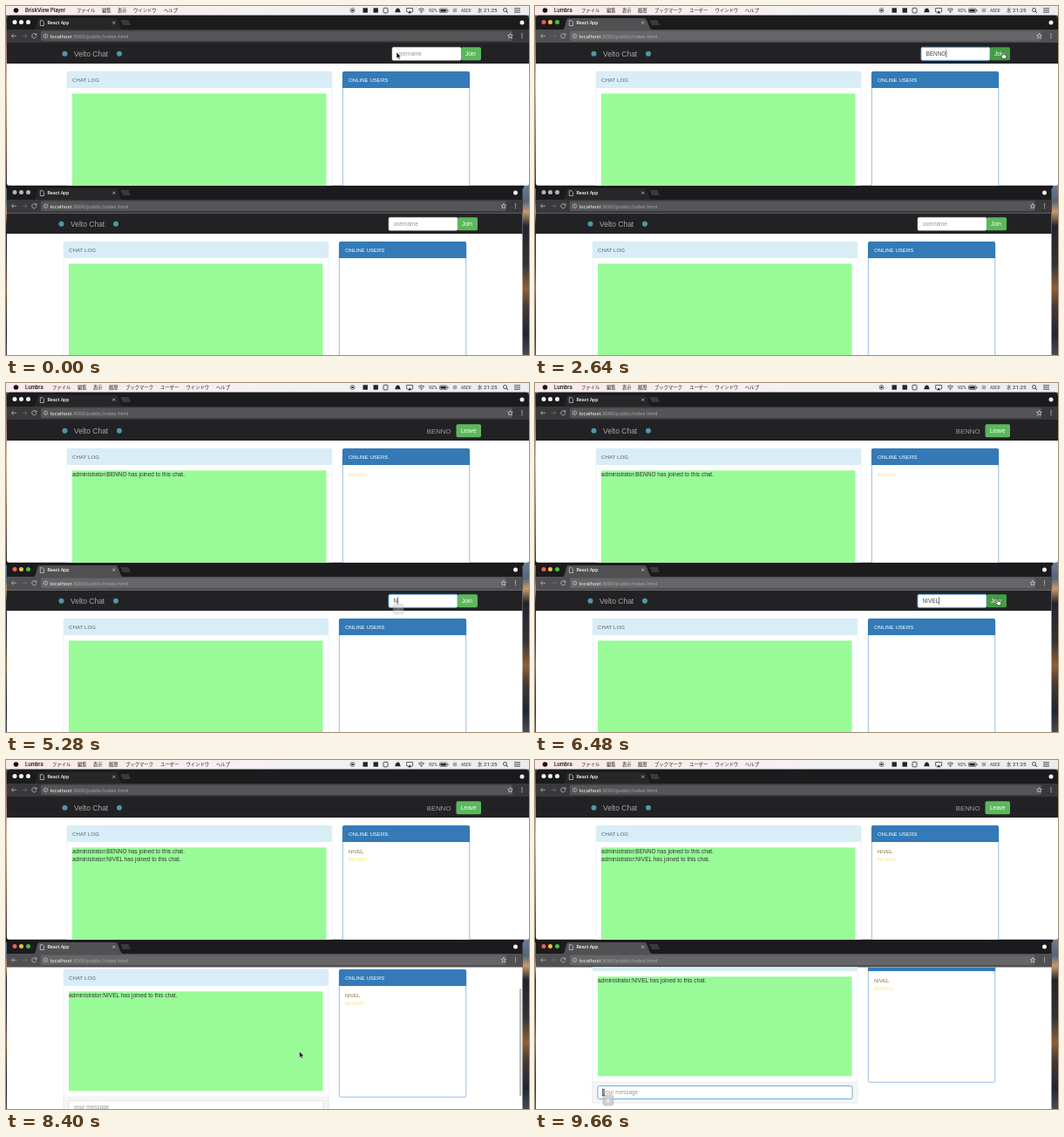
Recreate the animation shown at these times as an HTML page. Size 600 by 400 pixels, loop 9.72 s.

```html
<!DOCTYPE html>
<html lang="en">
<head>
<meta charset="utf-8">
<title>Chat demo</title>
<style>
html, body { margin: 0; width: 100%; height: 100%; overflow: hidden; background: #1b1b1d; }
svg { display: block; width: 100vw; height: 100vh; }
text { font-family: "Liberation Sans", Arial, sans-serif; white-space: pre; }
.ui { font-family: Roboto, sans-serif; }
.jp { font-family: "Noto Sans CJK JP", "Noto Sans CJK", sans-serif; }
.app { font-family: Inter, sans-serif; font-weight: 600; }
</style>
</head>
<body>
<svg id="stage" viewBox="0 0 600 400" xmlns="http://www.w3.org/2000/svg"></svg>
<script>
const LOOP = 9720, STEP = 60;
const USERS = ['BENNO', 'NIVEL'];
const CLICK = [600, 4740];      // username field gets focus
const TYPE = [1140, 5220];      // first key
const JOIN = [2820, 6720];
const FOCUS_MSG = 9360;
const GREEN = '#5cb85c', HOVER = '#449d44', BORDER = '#cccccc', FOCUS = '#66afe9';
const FIRST = '#f0e68c', SECOND = '#8a6d3b';

const rect = (x, y, w, h, fill, more = '') =>
  `<rect x="${x}" y="${y}" width="${w}" height="${h}" fill="${fill}" ${more}/>`;
const circle = (x, y, r, fill, more = '') =>
  `<circle cx="${x}" cy="${y}" r="${r}" fill="${fill}" ${more}/>`;
const line = (d, stroke, w = 0.8, more = '') =>
  `<path d="${d}" fill="none" stroke="${stroke}" stroke-width="${w}" ${more}/>`;
const text = (x, y, size, fill, str, more = '') =>
  `<text x="${x}" y="${y}" font-size="${size}" fill="${fill}" ${more}>${str}</text>`;
const group = (id, body, more = '') => `<g id="${id}" ${more}>${body}</g>`;

function wallpaper() {
  return rect(0, 0, 600, 400, 'url(#wall)') + rect(0, 10, 2, 195, 'url(#edge)');
}

function menuBar() {
  const ink = '#252527';
  const menu = (id, name, items) => group(id,
    text(22, 7.2, 5.7, '#151517', name, 'class="app"') +
    items.map(([x, s]) => text(x, 7.2, 5.35, ink, s, 'class="jp"')).join(''));
  return rect(0, 0, 600, 10.5, 'url(#bar)') + circle(11.5, 5, 2.8, '#151517') +
    menu('menuA', 'BriskView Player',
      [[81, 'ファイル'], [110, '編集'], [128, '表示'], [146, 'ウインドウ'], [181, 'ヘルプ']]) +
    menu('menuB', 'Lumbra',
      [[53, 'ファイル'], [82, '編集'], [100, '表示'], [118, '履歴'], [137, 'ブックマーク'],
       [177, 'ユーザー'], [206.5, 'ウインドウ'], [241, 'ヘルプ']]) +
    circle(397.5, 5, 2.5, 'none', `stroke="${ink}" stroke-width=".6"`) + circle(397.5, 5, 1.2, ink) +
    rect(409.5, 2.3, 5.4, 5.4, ink) + rect(421.5, 2.3, 5.4, 5.4, ink) +
    rect(433, 2.3, 5, 5.6, 'none', `rx="1" stroke="${ink}" stroke-width=".8"`) +
    `<path d="M446 7.2c1.2-1 .6-4.8 3.5-4.8s2.3 3.8 3.5 4.8z" fill="${ink}"/>` +
    line('M461 6.8h-1.4v-4.3h7v4.3h-1.4', ink, 0.7) + `<path d="M460.8 8.2l2.3-2.6 2.3 2.6z" fill="${ink}"/>` +
    line('M473 4.2q3.5-3 7 0M474.3 5.7q2.2-1.8 4.4 0', ink, 0.8) + circle(476.5, 7.1, 0.8, ink) +
    text(485, 7.1, 5.3, ink, '92%', 'class="ui"') +
    rect(497.5, 3, 8.5, 4.4, 'none', `rx=".8" stroke="${ink}" stroke-width=".6"`) +
    rect(498.4, 3.9, 6.4, 2.6, ink) + rect(506.6, 4.3, 0.8, 1.8, ink) +
    rect(512.7, 2.7, 4.6, 4.6, '#a9a9ad', 'rx=".8"') +
    text(522, 7, 4.7, ink, 'ASCII', 'class="ui"') +
    text(541, 7.2, 5.4, ink, '水', 'class="jp"') + text(548, 7.3, 6.2, ink, '21:25', 'class="ui"') +
    circle(572.5, 4.5, 2, 'none', `stroke="${ink}" stroke-width=".8"`) + line('M574 6l2 2', ink, 0.9) +
    line('M583 2.8h7M583 5h7M583 7.2h7', ink, 0.8);
}

// browser frame: i = window index, y = top edge, w = width
function frame(i, y, w) {
  const r = w - 8, g = '#d6d6d8';
  const lights = [10, 17.5, 25.5].map((x, k) => circle(x, 8.5, 2.5, g, `id="light${i}${k}"`)).join('');
  const body =
    `<path d="M1 33V4.8q0-4 4-4H${w - 4}q4 0 4 4V33z" fill="#1b1b1d"/>` + lights +
    `<path id="tab${i}" d="M32 17c3 0 3-13 6-13h88c3 0 5 13 8 13z"/>` +
    '<path d="M131.500 6h9l2.500 6h-9z" fill="#3a3a3c"/>' +
    line('M39.3 6.7h2.6l1.6 1.6v4.2h-4.2z', g, 0.7) +
    text(47.5, 11.4, 5.4, '#f5f5f5', 'React App', 'class="ui" font-weight="500"') +
    line('M122.2 7.7l3 3m0-3l-3 3', g, 0.7) +
    circle(r, 9, 2.5, '#f0f0f0') +
    rect(1, 17, w - 1, 16, '#444', `id="tool${i}"`) +
    rect(40, 18.5, w - 59, 11.5, '#555', `id="url${i}" rx="1.5"`) +
    line('M12 24.3h-5.5m2.4-2.4l-2.4 2.4 2.4 2.4', '#b4b4b6') +
    line('M18.5 24.3h5.5m-2.4-2.4l2.4 2.4-2.4 2.4', '#6a6a6c') +
    line('M34.4 22.6a2.6 2.6 0 1 0 .5 2.2M35 21.4v1.9h-2', '#c4c4c6') +
    circle(45.5, 24.3, 2.3, 'none', `stroke="${g}" stroke-width=".6"`) +
    line('M45.5 23.8v1.8M45.5 22.6v.6', g, 0.6) +
    `<text class="ui" x="50.5" y="26.5" font-size="6.1" fill="#f0f0f0">localhost<tspan fill="#a5a5a7">:3000/public/index.html</tspan></text>` +
    `<path d="M${w - 21.5} 21.4l.85 1.9 2 .2-1.5 1.4.45 2-1.8-1.05-1.8 1.05.45-2-1.5-1.4 2-.2z" fill="none" stroke="${g}" stroke-width=".7"/>` +
    [22, 24.3, 26.6].map(v => circle(r, v, 0.7, g)).join('');
  return `<g transform="translate(0 ${y})">${body}</g>`;
}

// page drawn for a 600 px wide window, origin at the top of the nav bar
function page(i) {
  const field = (id, x, y, w, h) => rect(x, y, w, h, '#fff', `id="${id}" rx="1.5" stroke="${BORDER}" stroke-width=".5"`);
  const button = (id, x, w, label, tx) =>
    rect(x, 4.3, w, 15, GREEN, `id="${id}" rx="1.8"`) + text(tx, 14.2, 6.5, '#fff', label);
  const nav = rect(-10, -1, 630, 24, '#222224') +
    circle(67.5, 11.7, 3, '#4f97a8') + circle(130, 11.7, 3, '#4f97a8') +
    text(78, 15, 8.5, '#a6a6a8', 'Velto Chat') +
    group('form' + i,
      field('name' + i, 443, 4.3, 79, 15) +
      text(448.5, 14, 6.4, '#999', 'username', `id="hint${i}"`) +
      text(448.5, 14, 6.4, '#444', '', `id="typed${i}"`) +
      rect(0, 7.5, 0.7, 8.5, '#333', `id="caret${i}"`) + button('join' + i, 522, 23, 'Join', 527)) +
    group('user' + i,
      text(510.5, 14.8, 7.8, '#a0a0a2', USERS[i], 'text-anchor="end"') +
      button('leave' + i, 516.5, 28.5, 'Leave', 522));
  const log = rect(70, 32, 304, 170, '#fff', 'rx="2" stroke="#d3ebf3" stroke-width=".5"') +
    rect(70, 32, 304, 19, '#d9edf7', 'rx="2"') +
    text(76, 43.8, 6.2, '#55646c', 'CHAT LOG') +
    rect(76, 57.3, 291.5, 114, '#98fb98') +
    text(76, 64, 6.5, '#333', '', `id="msg${i}0"`) + text(76, 73, 6.5, '#333', '', `id="msg${i}1"`) +
    rect(70, 178, 304, 24, '#f5f5f5', 'stroke="#e2e2e2" stroke-width=".5"') +
    field('send' + i, 76, 182.5, 292, 15) + text(82, 192.3, 6.4, '#999', 'your message') +
    rect(81.3, 185.8, 0.7, 8.5, '#333', `id="sendCaret${i}"`);
  const online = rect(386.3, 32.3, 145.5, 146, '#fff', 'rx="2" stroke="#337ab7" stroke-width=".5"') +
    '<path d="M386 51V34q0-2 2-2h142q2 0 2 2v17z" fill="#337ab7"/>' +
    text(393, 43.8, 6.1, '#fff', 'ONLINE USERS') +
    text(393, 64, 6, SECOND, '', `id="list${i}0"`) + text(393, 73, 6, FIRST, '', `id="list${i}1"`);
  return nav + log + online;
}

const ime = rect(-6, -6, 12, 12, '#c6c6c8', 'rx="2.5" stroke="#a8a8aa" stroke-width=".6"') +
  text(0, 2.8, 8, '#fff', 'A', 'text-anchor="middle"');

const pointers =
  group('arrow', '<path d="M0 0v7.200l1.700-1.500 1.100 2.500 1.300-.6-1.100-2.400h2.200z" fill="#111" stroke="#fff" stroke-width=".5"/>') +
  group('hand', '<path d="M-.8-2.500q.8-.9 1.500 0v2.700l2.600.6q.7.300.6 1.200l-.6 2.800h-3.500l-2.400-2.800q.4-1.200 1.800-.2z" fill="#fff" stroke="#111" stroke-width=".6"/>') +
  group('beam', line('M-1.300-3.800q1.300 0 1.300 1 0-1 1.300-1M0-3v6M-1.300 3.800q1.300 0 1.300-1 0 1 1.300 1', '#222', 0.7));

const stops = list => list.map(([o, c]) => `<stop offset="${o}" stop-color="${c}"/>`).join('');
document.getElementById('stage').innerHTML =
  `<defs>
    <linearGradient id="bar">${stops([[0, '#fae9e7'], [0.5, '#f5f1f2'], [1, '#ececef']])}</linearGradient>
    <linearGradient id="edge" x2="0" y2="1">${stops([[0, '#5f4c46'], [0.4, '#e3b6a0'], [0.75, '#93644e'], [1, '#3a2c2a']])}</linearGradient>
    <linearGradient id="wall" x2="0" y2="1">${stops([[0.51, '#6d7f95'], [0.56, '#54657a'], [0.59, '#c79a6a'], [0.63, '#20242c'], [0.74, '#343436'], [0.81, '#8f6038'], [0.86, '#473a34'], [0.94, '#1e2636'], [1, '#4c4a52']])}</linearGradient>
    <clipPath id="clip0"><path d="M1 42H600V203.300q0 2.500-2.500 2.500H3.500q-2.500 0-2.500-2.500z"/></clipPath>
    <clipPath id="clip1"><rect x="1" y="237.500" width="591.500" height="163"/></clipPath>
  </defs>` +
  wallpaper() + menuBar() + rect(0, 203, 594, 6, '#161618') +
  frame(0, 10, 600) +
  frame(1, 205, 592.5) +
  `<g clip-path="url(#clip0)">${rect(0, 40, 600, 170, '#fff')}<g transform="translate(0 43)">${page(0)}</g></g>` +
  `<g clip-path="url(#clip1)">${rect(0, 230, 600, 170, '#fff')}${group('scroller', page(1))}` +
  rect(589, 238, 2.3, 123, '#bdbdbd', 'id="thumb" rx="1.1"') + '</g>' +
  group('ime', ime) + group('pointer', pointers);

const el = id => document.getElementById(id);
const set = (id, name, v) => el(id).setAttribute(name, v);
const show = (id, on) => set(id, 'visibility', on ? 'inherit' : 'hidden');
const clamp = v => Math.max(0, Math.min(1, v));
const ramp = (t, a, b) => { const u = clamp((t - a) / (b - a)); return u * u * (3 - 2 * u); };

const ROUTE = [[0, 448, 53], [2200, 448, 53], [2560, 537, 55.5], [3180, 537, 55.5], [4140, 455, 250],
  [6180, 455, 250], [6480, 531, 250], [6840, 531, 250], [7200, 336.5, 334], [8760, 336.5, 334],
  [9240, 79, 381], [LOOP, 79, 381]];

function pointerAt(t) {
  let k = 1;
  while (t > ROUTE[k][0]) k++;
  const [a, x, y] = ROUTE[k - 1], [b, x2, y2] = ROUTE[k], u = ramp(t, a, b);
  return [x + (x2 - x) * u, y + (y2 - y) * u];
}

function outline(id, on) {
  set(id, 'stroke', on ? FOCUS : BORDER);
  set(id, 'stroke-width', on ? 1 : 0.5);
}

function drawWindow(i, t, active) {
  const joined = t >= JOIN[i], focused = active && t >= CLICK[i];
  const idle = i && t < CLICK[1] ? '#b4b4b6' : '#f6f6f6';
  ['#f0604f', '#f3bd3e', '#46c04b'].forEach((c, k) => set(`light${i}${k}`, 'fill', active ? c : idle));
  set('tab' + i, 'fill', active ? '#515153' : '#272729');
  set('tool' + i, 'fill', active ? '#505052' : '#39393b');
  set('url' + i, 'fill', active ? '#666668' : '#555557');

  const count = Math.max(0, Math.min(5, Math.floor((t - TYPE[i]) / 180) + 1));
  const label = el('typed' + i);
  label.textContent = USERS[i].slice(0, count);
  show('form' + i, !joined);
  show('user' + i, joined);
  show('hint' + i, !joined && !count);
  outline('name' + i, focused);
  show('caret' + i, focused && !joined);
  set('caret' + i, 'x', 448.8 + (count ? label.getComputedTextLength() : 0));
  const ring = joined && active && !(i && t >= FOCUS_MSG);
  set('leave' + i, 'stroke', ring ? '#5b9bd5' : 'none');
  set('leave' + i, 'fill', ring ? HOVER : GREEN);

  const here = USERS.filter((u, k) => t >= JOIN[k]);
  const lines = i ? here.slice(1) : here;
  const list = i && !joined ? [] : here.slice().reverse();
  for (let k = 0; k < 2; k++) {
    el(`msg${i}${k}`).textContent = lines[k] ? `administrator:${lines[k]} has joined to this chat.` : '';
    el(`list${i}${k}`).textContent = list[k] || '';
    set(`list${i}${k}`, 'fill', list[k] === USERS[0] ? FIRST : SECOND);
  }
  const writing = i === 1 && t >= FOCUS_MSG;
  show('sendCaret' + i, writing);
  outline('send' + i, writing);
}

function drawPointer(t) {
  const [x, y] = pointerAt(t);
  const typing = TYPE.some((s, i) => t >= s && t < [2200, 6180][i]);
  const overJoin = x > 518 && (y < 62 || (y > 242 && y < 258));
  const overField = (t >= CLICK[0] && t < 3180) || (t >= CLICK[1] && t < 6600) || t >= 9180;
  const kind = overJoin ? 'hand' : overField ? 'beam' : 'arrow';
  show('pointer', !typing);
  set('pointer', 'transform', `translate(${x} ${y})`);
  ['arrow', 'hand', 'beam'].forEach(k => show(k, k === kind));
  set('join0', 'fill', overJoin && y < 62 ? HOVER : GREEN);
  set('join1', 'fill', overJoin && y > 62 ? HOVER : GREEN);
}

function drawIme(t) {
  const spots = [[CLICK[0], 454, 64], [CLICK[1], 450, 259], [FOCUS_MSG, 84, 390]];
  const spot = spots.find(s => t >= s[0] && t < s[0] + 720);
  show('ime', !!spot);
  if (!spot) return;
  set('ime', 'transform', `translate(${spot[1]} ${spot[2]})`);
  set('ime', 'opacity', 0.8 * (1 - ramp(t, spot[0] + 360, spot[0] + 720)));
}

function draw(t) {
  const started = t >= CLICK[0], second = t >= CLICK[1];
  show('menuA', !started);
  show('menuB', started);
  drawWindow(0, t, started && !second);
  drawWindow(1, t, second);
  const y = 30 * ramp(t, 7920, 8200) + 17 * ramp(t, 8280 + 120, 8700);
  set('scroller', 'transform', `translate(-4 ${238 - y})`);
  set('thumb', 'y', 238 + y * 0.8);
  set('thumb', 'opacity', ramp(t, 7860, 7980) * (1 - ramp(t, 9000, 9240)));
  drawPointer(t);
  drawIme(t);
}

const begin = performance.now();
function tick() {
  const t = (performance.now() - begin) % LOOP;
  draw(Math.floor(t / STEP) * STEP);
  requestAnimationFrame(tick);
}
tick();
</script>
</body>
</html>
```
